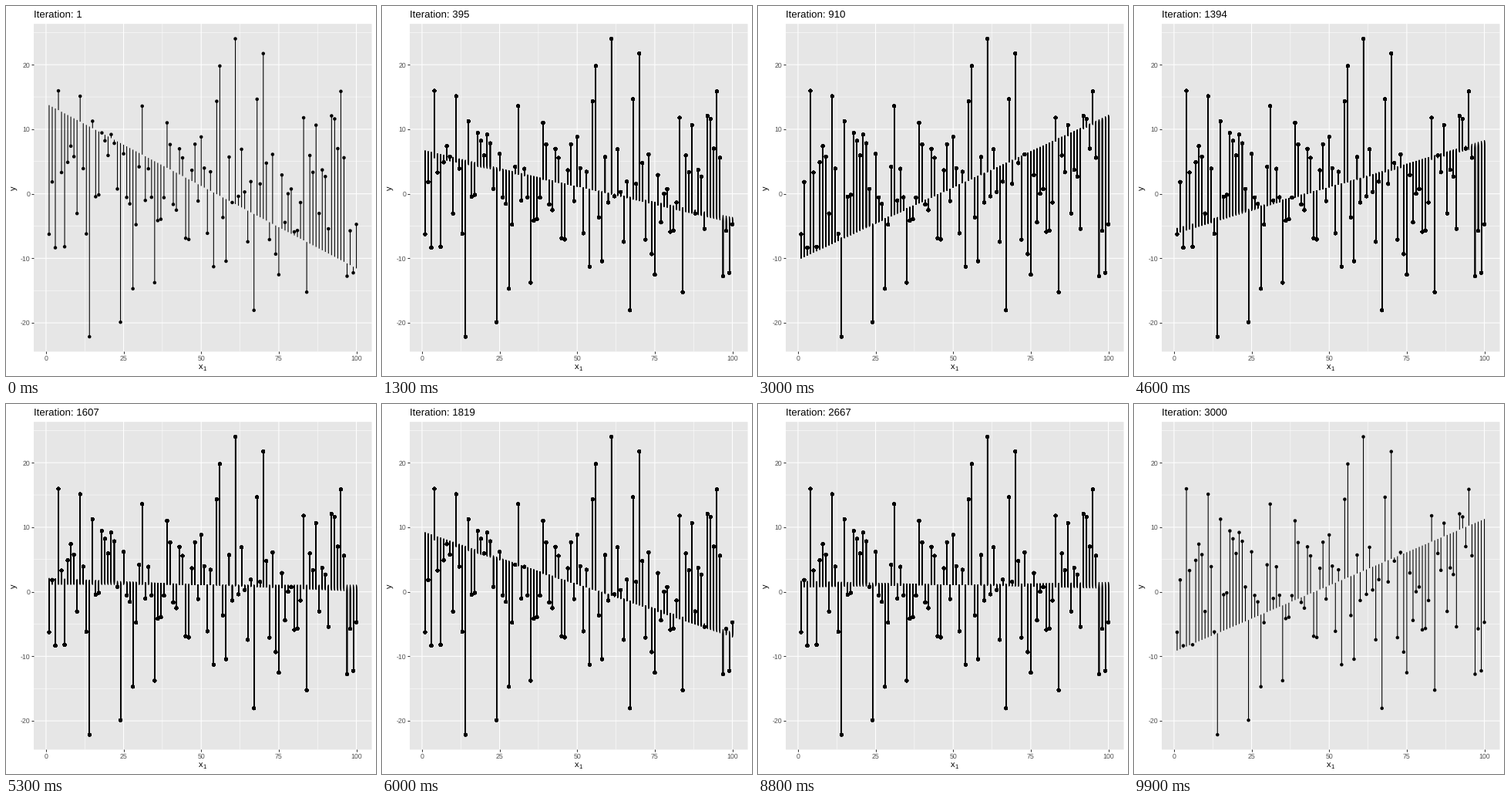
A matplotlib script for the animation above (10 s loop, 480 by 480 pixels).

```python
import math

import numpy as np
import matplotlib.pyplot as plt
from matplotlib.animation import FuncAnimation
from matplotlib.collections import LineCollection

plt.rcParams.update({"font.family": "Liberation Sans", "text.hinting": "none"})

SIZE, DPI = 480, 72          # at 72 dpi one point is one pixel
FRAMES, INTERVAL = 100, 100
STEPS = 3000
PERIOD, SWING = 70.3, 12.42  # frames per full swing of the line, height at its ends
LEFT, RIGHT, TOP, BOTTOM = 36, 474.5, 23.2, 448.4
MAJOR, MINOR, DOT = 1.07, 0.53, 4.62


def normal_quantile(p):
    """Invert the normal CDF by Newton's method."""
    z = 0.0
    for _ in range(40):
        cdf = 0.5 * math.erfc(-z / math.sqrt(2))
        pdf = math.exp(-z * z / 2) / math.sqrt(2 * math.pi)
        z -= (cdf - p) / pdf
    return z


def seeded_normals(seed, n):
    """Normals by inversion from a Mersenne Twister seeded with an LCG."""
    key = []
    for _ in range(675):
        seed = (69069 * seed + 1) % 2**32
        key.append(seed)
    rng = np.random.RandomState()
    rng.set_state(("MT19937", np.array(key[-624:], dtype=np.uint32), 624))
    raw = rng.randint(0, 2**32, size=2 * n, dtype=np.uint32) / 2**32
    big = 2**27
    uniform = (np.floor(big * raw[::2]) + raw[1::2]) / big
    return np.array([normal_quantile(u) for u in uniform])


x = np.arange(1, 101)
y = 10 * seeded_normals(1, len(x))
best_fit = np.polyval(np.polyfit(x, y, 1), x)
lever = np.linspace(1, -1, len(x))

# Inner frames overlay all iterations nearest to them.
clock = np.linspace(0, FRAMES - 1, STEPS)
nearest = np.rint(clock)


def fitted(t):
    """Line heights at every x for an array of times."""
    swing = SWING * np.cos(2 * np.pi * np.asarray(t) / PERIOD)
    return best_fit + swing[:, None] * lever


def segments(x0, y0, x1, y1):
    ends = np.broadcast_arrays(x0, y0, x1, y1)
    return np.stack(ends, axis=-1).reshape(-1, 2, 2)


def limits(v):
    pad = 0.05 * (v.max() - v.min())
    return v.min() - pad, v.max() + pad


fig = plt.figure(figsize=(SIZE / DPI, SIZE / DPI), dpi=DPI, facecolor="white")
ax = fig.add_axes([LEFT / SIZE, 1 - BOTTOM / SIZE,
                   (RIGHT - LEFT) / SIZE, (BOTTOM - TOP) / SIZE],
                  facecolor="#e6e6e6")
ax.patch.set_snap(False)
ax.set(xlim=limits(x), ylim=limits(y))
ax.set_axisbelow(True)
ax.spines[:].set_visible(False)
ax.set_xticks(range(0, 101, 25))
ax.set_xticks(np.arange(12.5, 100, 25), minor=True)
ax.set_yticks(range(-20, 21, 10), [str(v) for v in range(-20, 21, 10)])
ax.set_yticks(range(-15, 26, 10), minor=True)
ax.tick_params(length=2.75, width=MAJOR, pad=2.2, color="#333333",
               labelcolor="#4d4d4d", labelsize=8.8)
ax.tick_params(which="minor", length=0)
ax.grid(which="minor", color="white", lw=MINOR, snap=False)
ax.grid(which="major", color="white", lw=MAJOR, snap=False)


def label(px, py, text, size, **kw):
    return fig.text(px / SIZE, 1 - py / SIZE, text, fontsize=size, **kw)


title = label(LEFT, 15, "", 13.2)
label(250, 471, "x", 11)
label(255.6, 473.3, "1", 7.7)
label(11, 236, "y", 11, rotation=90, ha="center", va="center")


def strokes(width, cap):
    lines = LineCollection([], colors="black", linewidths=width,
                           capstyle=cap, snap=False)
    return ax.add_collection(lines, autolim=False)


residuals = strokes(MAJOR, "butt")
# Near-zero strokes with round caps make dots at sub-pixel positions.
dots = strokes(DOT, "round")
dot = segments(x - 0.001, y, x + 0.001, y)


def update(i):
    # The first and last frames hold a single iteration.
    times = clock[nearest == i] if 0 < i < FRAMES - 1 else [i]
    residuals.set_segments(segments(x, y, x, fitted(times)))
    dots.set_segments(np.tile(dot, (len(times), 1, 1)))
    step = round(1 + i * (STEPS - 1) / (FRAMES - 1))
    title.set_text(f"Iteration: {step}")
    return residuals, dots, title


anim = FuncAnimation(fig, update, frames=FRAMES, interval=INTERVAL,
                     repeat=True, repeat_delay=0)
plt.show()
```
